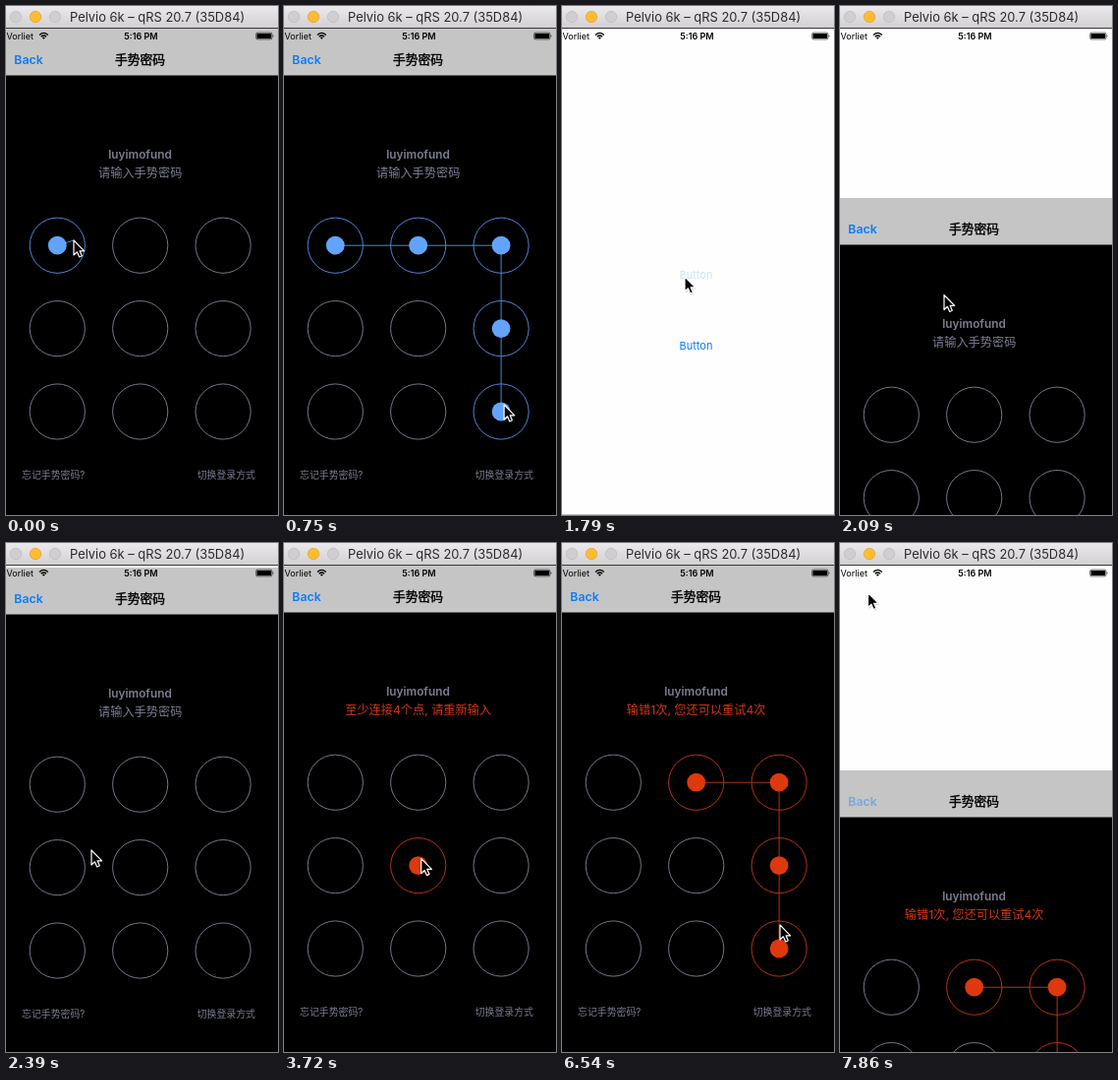
An HTML page that plays this animation: 277 by 517 pixels, repeating every 8 s.

```html
<!DOCTYPE html>
<html lang="zh">
<head>
<meta charset="utf-8">
<title>手势密码</title>
<style>
html, body { margin: 0; width: 100%; height: 100%; overflow: hidden; background: #000; }
svg { display: block; width: 100vw; height: 100vh; font-family: Inter, "Noto Sans CJK SC", "Noto Sans CJK", sans-serif; }
.mid { text-anchor: middle; }
.semi { font-weight: 600; }
.link { fill: #0b7cf8; }
.dim { fill: #7b7d90; }
#pad { --dot: #62a4fb; --line: #4888d8; }
#pad.error { --dot: #de380d; --line: #b7320e; }
#pad circle { fill: none; }
.ring { stroke: #737689; }
.on .ring { stroke: var(--line); }
#pad .on .dot { fill: var(--dot); }
#trail { fill: none; stroke: var(--line); }
</style>
</head>
<body>
<svg viewBox="0 0 277 517">
  <defs>
    <linearGradient id="chrome" x2="0" y2="1">
      <stop stop-color="#ebe9eb"/><stop offset="1" stop-color="#d2d0d2"/>
    </linearGradient>
  </defs>
  <rect width="277" height="517" fill="#fefefe"/>
  <g class="mid link" font-size="11">
    <text id="button" x="136.5" y="277">Button</text>
    <text x="136.5" y="348.7">Button</text>
  </g>

  <g id="sheet">
    <rect y="70" width="277" height="447"/>
    <rect y="23" width="277" height="47.5" fill="#c5c5c5"/>
    <text id="back" class="semi link" x="8.3" y="58.8" font-size="12.3">Back</text>
    <text class="mid" x="136.5" y="59.1" font-size="12.75" stroke="#000" stroke-width=".4">手势密码</text>
    <text class="mid semi dim" x="136.5" y="155.3" font-size="11.8">luyimofund</text>
    <text id="message" class="mid" x="136.7" y="174.4" font-size="12.2"></text>
    <g id="pad"><polyline id="trail"/></g>
    <g class="dim" font-size="9.9">
      <text x="16" y="479.7">忘记手势密码?</text>
      <text x="194.7" y="479.7">切换登录方式</text>
    </g>
  </g>

  <g font-size="9.1">
    <text x=".5" y="33.7">Vorliet</text>
    <text class="mid semi" x="137.5" y="33.7" font-size="9">5:16 PM</text>
    <path d="M34 29.4Q38.4 25.4 42.8 29.4M35.7 31.2Q38.4 28.8 41.1 31.2" fill="none" stroke="#000" stroke-width="1.3"/>
    <path d="M36.9 32.2Q38.4 31 39.9 32.2L38.4 33.8Z"/>
    <rect x="254.7" y="27.1" width="16.2" height="6.8" rx="1.4" fill="none" stroke="#000" stroke-width=".6"/>
    <rect x="255.5" y="27.9" width="14.6" height="5.2" rx=".7"/>
    <path d="M271.7 29.2q1.7 1.3 0 2.6z"/>
  </g>

  <rect width="277" height="22" fill="url(#chrome)"/>
  <rect y="22" width="277" height="1" fill="#3a383a"/>
  <g fill="#d0ced0" stroke="#bcbabc" stroke-width=".7">
    <circle cx="10" cy="11" r="5.7"/>
    <circle cx="30" cy="11" r="5.7" fill="#fdbc2f" stroke="#e0a032"/>
    <circle cx="50" cy="11" r="5.7"/>
  </g>
  <text x="65" y="15.9" font-size="12.9" fill="#2c2a2c">Pelvio 6k – qRS 20.7 (35D84)</text>

  <g id="cursor">
    <path d="M1 2V16.5L4.3 13.4L6.6 18.2L9 17.1L6.9 12.5H11.6Z" opacity=".18"/>
    <path d="M0 0V15L3.4 11.8L5.7 17L8.3 15.8L6.1 10.8H10.7Z" stroke="#fff" stroke-width="1.2" stroke-linejoin="round"/>
  </g>
</svg>
<script>
const LOOP = 8000, STEPS = 54, TRAVEL = 494;
const $ = id => document.getElementById(id);

// One node is reached per step from `at`; the result shows for `hold` steps after release.
const tooShort = "至少连接4个点, 请重新输入";
const gestures = [
  { at: 0, path: [0, 1, 2, 5, 8], hold: 2 },
  { at: 19, path: [3], hold: 2, error: tooShort },
  { at: 24, path: [4], hold: 2, error: tooShort },
  { at: 28, path: [2], hold: 2, error: tooShort },
  { at: 37, path: [1, 2, 5, 8], hold: STEPS, error: "输错1次, 您还可以重试4次" }
];

const nodes = Array.from({ length: 9 }, (_, i) => [52.3 + i % 3 * 84.4, 243.2 + Math.floor(i / 3) * 84.4]);
const cells = nodes.map(([x, y]) => {
  const g = document.createElementNS("http://www.w3.org/2000/svg", "g");
  g.innerHTML = `<circle class="ring" cx="${x}" cy="${y}" r="28.1"/><circle class="dot" cx="${x}" cy="${y}" r="9.4"/>`;
  return $("pad").appendChild(g);
});

// The pointer visits every node it touches, plus a few stops in between.
const stops = new Map();
for (const { at, path } of gestures)
  for (let i = 0; i <= path.length; i++) {
    const [x, y] = nodes[path[Math.min(i, path.length - 1)]];
    stops.set(at + i, [x + 3, y - 7]);
  }
stops.set(0, [69, 238]).set(7, [211, 417]).set(12, [125, 275]).set(16, [87, 312])
  .set(34, [85, 262]).set(44, [222, 388]).set(51, [28.5, 50.5]);
const times = [...stops.keys()].sort((a, b) => a - b);

function pointer(step) {
  const from = times.findLast(s => s <= step);
  const to = times.find(s => s > step) ?? from;
  const u = (step - from) / (to - from || 1);
  return stops.get(from).map((v, i) => v + (stops.get(to)[i] - v) * u);
}

function spring(steps) {
  const k = Math.max(0, steps) * 2.705;
  return 1 - Math.exp(-k) * (1 + k);
}

// Dismissed, presented again, dismissed once more
const sheetOffset = step =>
  Math.floor(TRAVEL * (spring(step - 5.98) - spring(step - 13.18) + spring(step - 52.468)));

function draw(step) {
  const tip = pointer(step);
  const started = gestures.findLast(g => g.at <= step);
  const count = step - started.at + 1;
  const released = count > started.path.length;
  const active = count <= started.path.length + started.hold;
  const picked = active ? started.path.slice(0, count) : [];
  const failed = released && started.error;
  const points = picked.map(n => nodes[n]);
  if (active && !failed) points.push(tip);

  $("sheet").setAttribute("transform", `translate(0 ${sheetOffset(step)})`);
  $("cursor").setAttribute("transform", `translate(${tip})`);
  $("trail").setAttribute("points", points.join(" "));
  $("pad").setAttribute("class", failed ? "error" : "");
  cells.forEach((cell, i) => cell.setAttribute("class", picked.includes(i) ? "on" : ""));

  const error = gestures.findLast(g => g.error && g.at + g.path.length <= step)?.error;
  $("message").textContent = error || "请输入手势密码";
  $("message").setAttribute("fill", error ? "#d2360e" : "#7b7d90");
  $("button").setAttribute("opacity", step === 12 || step === 13 ? 0.2 : 1);
  $("back").style.fill = step >= 52 ? "#74a8dc" : "";
}

function frame(now) {
  draw(Math.floor(now % LOOP / LOOP * STEPS));
  requestAnimationFrame(frame);
}
draw(0);
requestAnimationFrame(frame);
</script>
</body>
</html>
```
